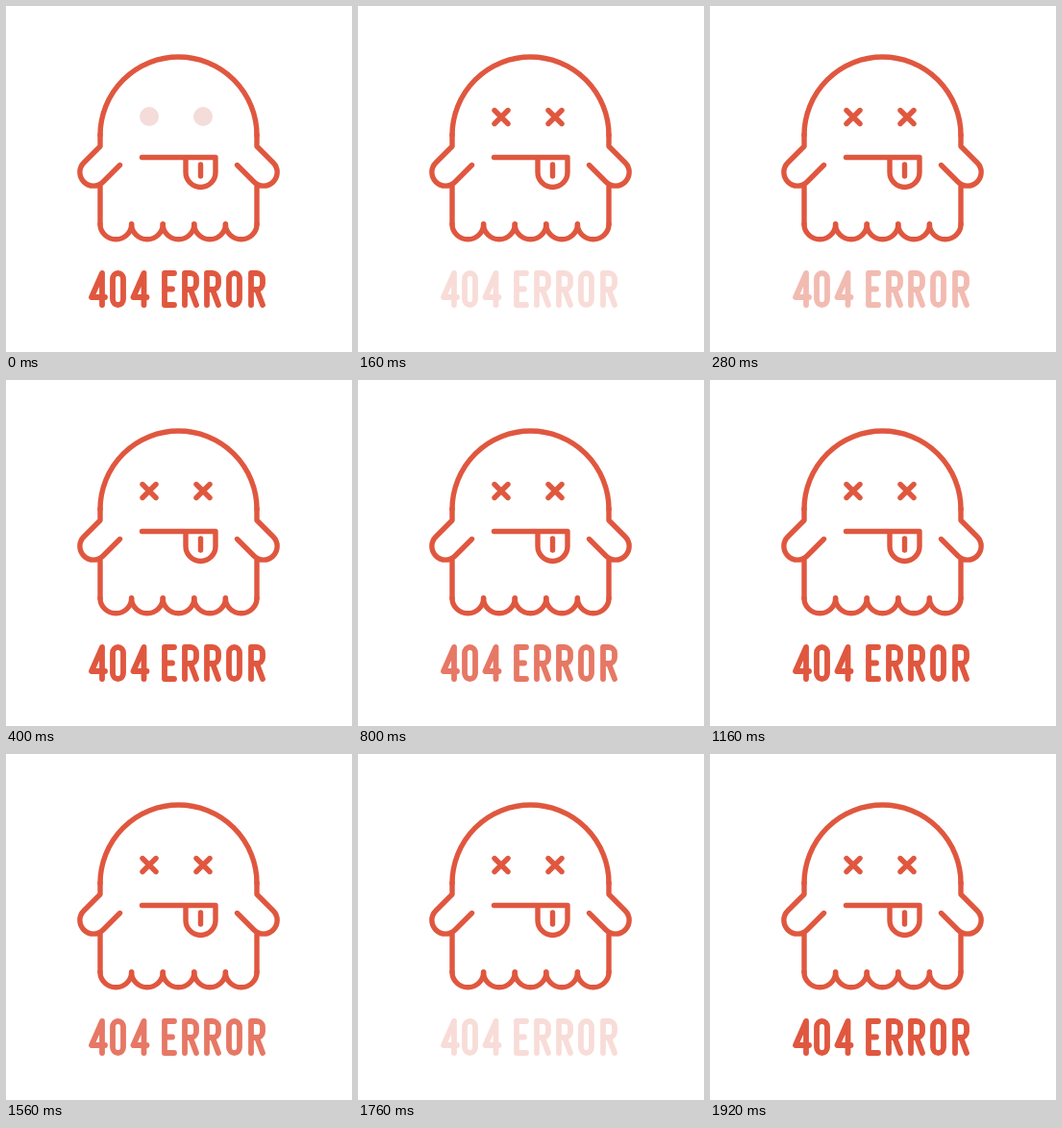
These frames come from a looping animation (360x360 px, 2 s). An HTML page without scripts:

```html
<!DOCTYPE html>
<html lang="en">
<head>
<meta charset="utf-8">
<title>404 ERROR</title>
<style>
  html, body { margin: 0; width: 100%; height: 100%; overflow: hidden; background: #fff; }
  svg { display: block; width: 100vw; height: 100vh; }
  .line { fill: none; stroke: #e0573f; stroke-width: 5.4; stroke-linecap: round; stroke-linejoin: round; }
  .dots { fill: #f4dcda; animation: dots 2s step-end infinite; }
  .crosses { animation: crosses 2s step-end infinite; }
  .lettering { stroke-width: 5.8; animation: blink 2s steps(5, start) infinite; }

  @keyframes dots { 0% { opacity: 1 } 2%, 100% { opacity: 0 } }
  @keyframes crosses { 0% { opacity: 0 } 2%, 100% { opacity: 1 } }
  /* Three dips, each five steps out and five steps back in */
  @keyframes blink {
    0%, 2%, 22%, 40%, 60%, 78%, 98%, 100% { opacity: 1 }
    12%, 50%, 88% { opacity: 0 }
  }
</style>
</head>
<body>
<svg viewBox="0 0 360 360" role="img" aria-label="Ghost, 404 ERROR">
  <defs>
    <path id="cross" d="M-7-7L7 7M7-7L-7 7"/>
    <path id="arm" d="M98 134V146L81 163A14.1 14.1 0 0 0 101 183L118.500 165.500M98 186V227"/>
    <path id="scallop" d="M0 227a16.300 15.800 0 0 0 32.600 0"/>
    <path id="four" d="M14 33V0L3 25H17"/>
    <path id="zero" d="M0 6a5.500 6 0 0 1 11 0V27a5.500 6 0 0 1-11 0Z"/>
    <path id="r" d="M0 33V0H6a6 6 0 0 1 6 6V11a6 6 0 0 1-6 6H0M6 17L12 33"/>
  </defs>

  <g class="line">
    <path d="M98 134.500a81.500 81.500 0 0 1 163 0"/>
    <use href="#arm"/>
    <use href="#arm" transform="matrix(-1 0 0 1 359 0)"/>
    <use href="#scallop" x="98"/>
    <use href="#scallop" x="130.600"/>
    <use href="#scallop" x="163.200"/>
    <use href="#scallop" x="195.800"/>
    <use href="#scallop" x="228.400"/>
    <path d="M141.500 157.500H218V173a15.500 15.500 0 0 1-31 0V158M202.500 165V177"/>
  </g>

  <g class="dots">
    <circle cx="149" cy="115" r="10"/>
    <circle cx="205" cy="115" r="10"/>
  </g>
  <g class="line crosses">
    <use href="#cross" x="149" y="115.500"/>
    <use href="#cross" x="205" y="115.500"/>
  </g>

  <g class="line lettering">
    <g transform="translate(0 278)">
      <use href="#four" x="86"/>
      <use href="#zero" x="111"/>
      <use href="#four" x="129.500"/>
      <path d="M175 0H165V33H175M165 16.500H173"/>
      <use href="#r" x="186"/>
      <use href="#r" x="209"/>
      <use href="#zero" x="232"/>
      <use href="#r" x="255"/>
    </g>
  </g>
</svg>
</body>
</html>
```
